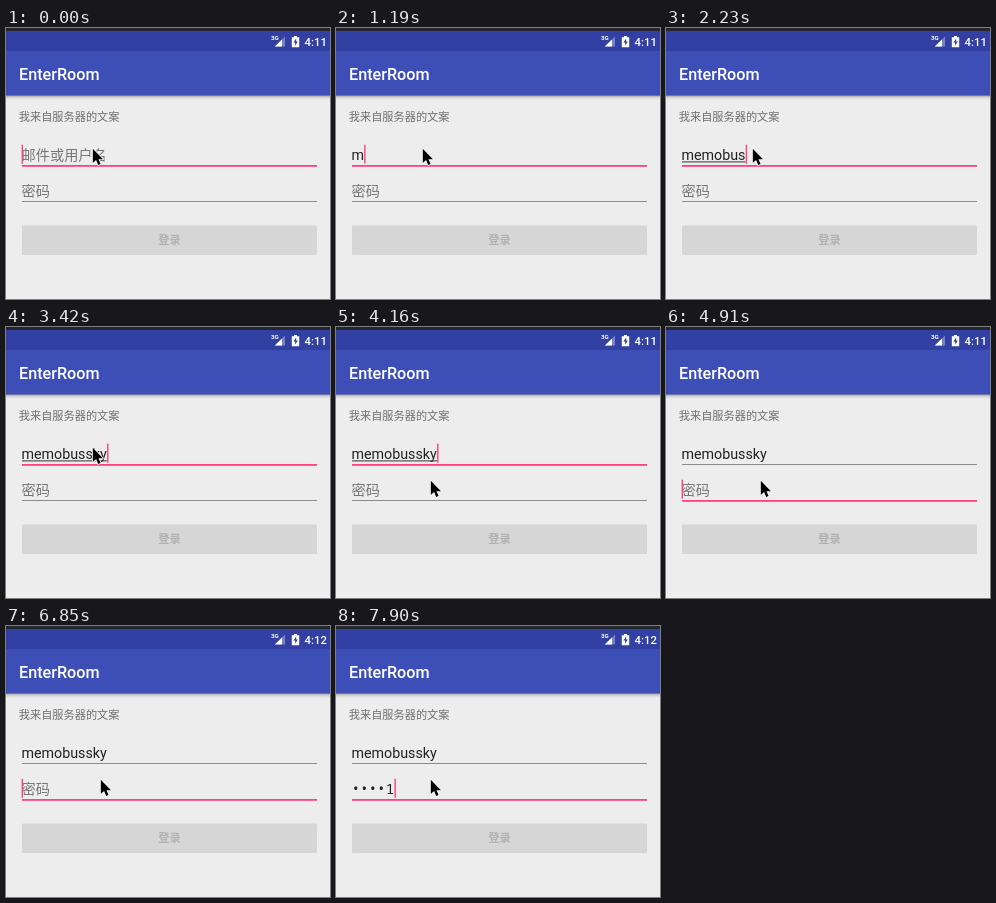
Recreate the animation shown at these times as an HTML page. Size 324 px wide and 271 px high, loop 8 s.

```html
<!DOCTYPE html>
<html lang="zh">
<head>
<meta charset="utf-8">
<title>登录</title>
<style>
  html, body { margin: 0; width: 100%; height: 100%; overflow: hidden; background: #ededed; }
  svg { display: block; width: 324px; height: 271px; }
  text { font-family: Roboto, "Noto Sans CJK SC", "Noto Sans CJK", sans-serif; white-space: pre; }
  .field { font-size: 14.3px; fill: #212121; }
  .hint { font-size: 14.2px; fill: #777; }
  .secret { font-family: "Noto Sans Mono", "DejaVu Sans Mono", monospace; }
</style>
</head>
<body>
<svg viewBox="0 0 324 271">
  <defs>
    <linearGradient id="shade" x1="0" y1="0" x2="0" y2="1">
      <stop offset="0" stop-color="#000" stop-opacity=".38"/>
      <stop offset=".45" stop-color="#000" stop-opacity=".12"/>
      <stop offset="1" stop-color="#000" stop-opacity="0"/>
    </linearGradient>
  </defs>

  <rect width="324" height="271" fill="#ededed"/>
  <rect y="67" width="324" height="5" fill="url(#shade)"/>
  <rect y="23" width="324" height="44.5" fill="#3d4fb7"/>
  <rect width="324" height="23" fill="#3140a2"/>
  <rect width="324" height="3" fill="#25262d"/>

  <!-- status icons -->
  <text x="265" y="12.2" font-size="6.2" font-weight="700" fill="#fff">3G</text>
  <path d="M279 8.5V18.5H268.8Z" fill="#fff" fill-opacity=".35"/>
  <path d="M276 11.5V18.5H268.8Z" fill="#fff"/>
  <path d="M288 8h3v1.2h2.2v10h-7.4v-10h2.2z" fill="#fff"/>
  <path d="M290.2 10.6l-2.8 4h1.8v3.2l2.6-4.2h-1.6z" fill="#3140a2"/>
  <text id="clock" x="298.6" y="17.5" font-size="11.3" font-weight="500" fill="#fff"></text>

  <text x="13" y="52" font-size="16.2" font-weight="500" fill="#fff">EnterRoom</text>
  <text x="12.8" y="93.1" font-size="11.2" fill="#6f6f6f">我来自服务器的文案</text>

  <text id="userHint" class="hint" x="15.6" y="132.2">邮件或用户名</text>
  <text id="user" class="field" x="15.4" y="132"></text>
  <rect id="compose" x="16" y="133.4" height="1" fill="#333"/>
  <rect id="userLine" x="16" y="137" width="295"/>

  <text id="passHint" class="hint" x="15.6" y="168.2">密码</text>
  <text id="pass" class="field secret" x="15.4" y="168"></text>
  <rect id="passLine" x="16" y="173" width="295"/>

  <rect id="caret" width="1.4" height="19" fill="#ff4081"/>

  <rect x="16" y="197.5" width="295" height="29.5" rx="1" fill="#d6d6d6"/>
  <text x="163.5" y="216.2" font-size="11.2" font-weight="700" fill="#b2b2b2" text-anchor="middle">登录</text>

  <path id="pointer" d="M0 0V14.3L3.3 11.3L5.4 16.1L7.8 15.1L5.7 10.4H10.2Z"
        fill="#000" stroke="#fff" stroke-width="1.6" paint-order="stroke" stroke-linejoin="round"/>
</svg>
<script>
const LOOP = 8000;
const NAME = "memobussky";
const $ = id => document.getElementById(id);

// Each list holds the moments at which its value steps on.
const nameTimes = [1190, 1490, 1640, 1790, 1940, 2090, 2230, 2980, 3130, 3270];
const passTimes = [7000, 7150, 7450, 7600, 7900];
const caretTimes = [150, 600, 2830, 2980, 3720, 4160, 4760, 4910, 5350, 5800, 6400, 6850];
const composeTimes = [1340, 3270, 3420, 4910];
const moves = [[86.8, 120.8], [87.6, 126], [90.2, 139], [93.4, 150], [94.8, 153.8]];
const moveTimes = [3720, 3870, 4010, 4160];
const FOCUS_TIME = 4910, CLOCK_TIME = 5650;

const passed = (times, t) => times.filter(at => at <= t).length;
const show = (el, on) => el.setAttribute("visibility", on ? "visible" : "hidden");

function setLine(el, focused) {
  el.setAttribute("height", focused ? 1.8 : 1);
  el.setAttribute("fill", focused ? "#ff4081" : "#8b8b8b");
}

function draw(t) {
  const typed = passed(nameTimes, t);
  const keys = passed(passTimes, t);
  const onPass = t >= FOCUS_TIME;

  $("clock").textContent = t < CLOCK_TIME ? "4:11" : "4:12";
  $("user").textContent = NAME.slice(0, typed);
  $("pass").textContent = keys ? "•".repeat(keys - 1) + "1" : "";
  show($("userHint"), !typed);
  show($("passHint"), !keys);
  setLine($("userLine"), !onPass);
  setLine($("passLine"), onPass);

  const nameWidth = typed ? $("user").getComputedTextLength() : 0;
  $("compose").setAttribute("width", Math.max(0, nameWidth - 0.6));
  show($("compose"), passed(composeTimes, t) % 2 === 1);

  const width = onPass ? (keys ? $("pass").getComputedTextLength() : 0) : nameWidth;
  $("caret").setAttribute("x", 15.6 + width);
  $("caret").setAttribute("y", onPass ? 152.7 : 116.7);
  show($("caret"), passed(caretTimes, t) % 2 === 0);

  $("pointer").setAttribute("transform", `translate(${moves[passed(moveTimes, t)]})`);
}

const start = performance.now();
function tick() {
  draw((performance.now() - start) % LOOP);
  requestAnimationFrame(tick);
}
tick();
</script>
</body>
</html>
```
